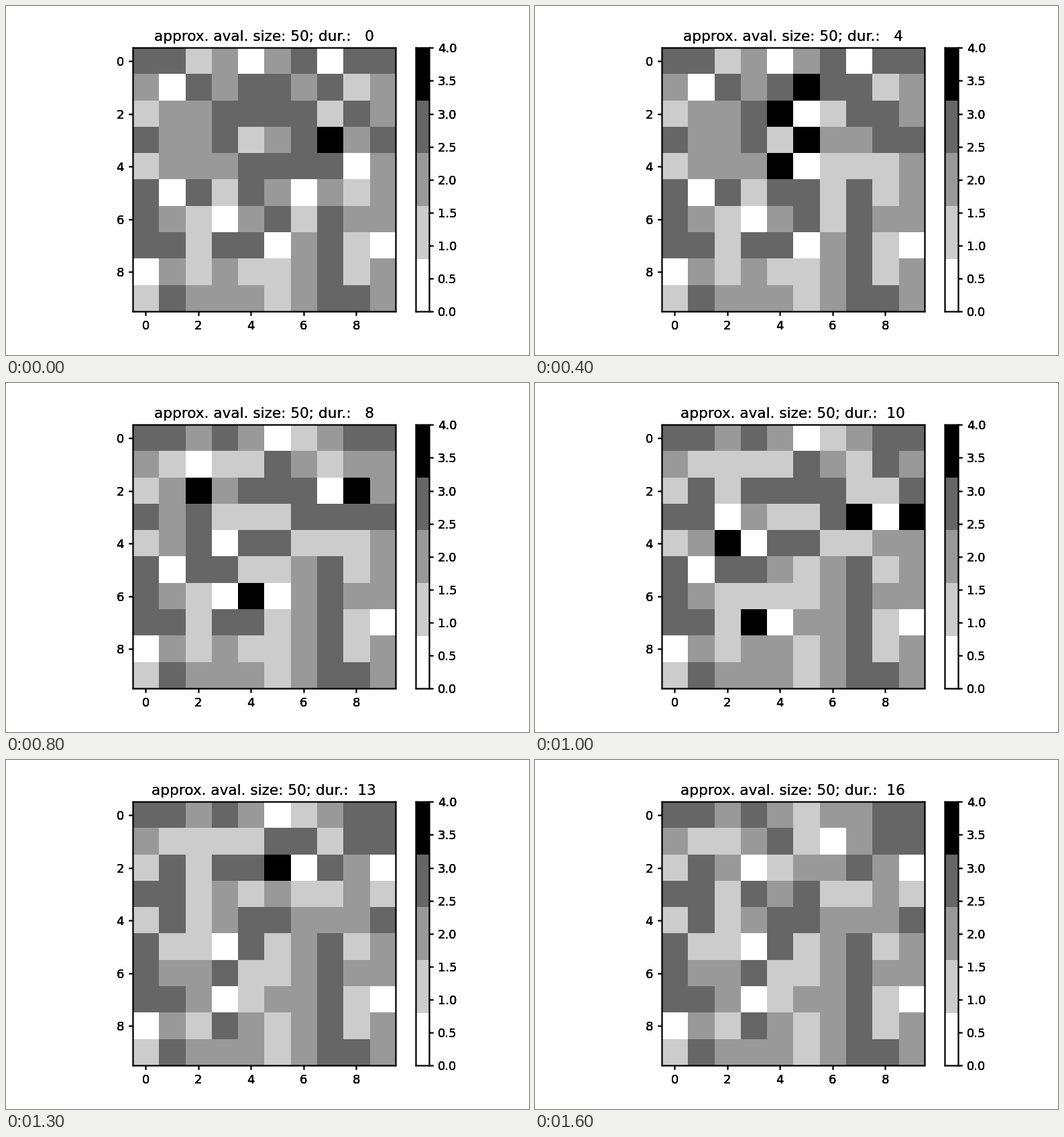
A matplotlib script that plays this animation: 780 px wide and 520 px high, repeating every 1.7 s.

```python
import numpy as np
import matplotlib.pyplot as plt
from matplotlib.animation import FuncAnimation
from matplotlib.colors import ListedColormap

STEPS = 16
LIMIT = 4
START = """
3312023033
2032332312
1223333132
3223123423
1222333302
3031320212
3210231322
3313302310
0212112312
1322212332
"""

plt.rcParams["font.family"] = "DejaVu Sans"
shades = ListedColormap(["1.0", "0.8", "0.6", "0.4", "0.0"])


def topple(grid):
    """Empty every full cell at once and pass one grain to each neighbour."""
    full = grid >= LIMIT
    give = np.pad(full.astype(int), 1)
    gain = give[:-2, 1:-1] + give[2:, 1:-1] + give[1:-1, :-2] + give[1:-1, 2:]
    return np.where(full, 0, grid) + gain


grids = [np.array([[int(c) for c in row] for row in START.split()])]
for _ in range(STEPS):
    grids.append(topple(grids[-1]))

fig = plt.figure(figsize=(6, 4), dpi=130, facecolor="white")
bottom, height = 0.125, 0.755
width = height * 4 / 6
main_box = [0.745 - width, bottom, width, height]
bar_box = [0.78375, bottom, width / 20, height]


def layer(box, xlim, ylim):
    ax = fig.add_axes(box)
    ax.patch.set_visible(False)
    ax.set(xlim=xlim, ylim=ylim)
    return ax


def main_layer():
    ax = layer(main_box, (-0.5, 9.5), (9.5, -0.5))
    ax.set_xticks(range(0, 10, 2))
    ax.set_yticks(range(0, 10, 2))
    return ax


def bar_layer():
    ax = layer(bar_box, (0, 1), (0, LIMIT))
    ax.set_xticks([])
    ax.yaxis.tick_right()
    ticks = np.arange(0, 4.1, 0.5)
    ax.set_yticks(ticks, [f"{t:.1f}" for t in ticks])
    return ax


# Stacked copies of the frames darken the soft edges of lines and labels.
mains = [main_layer() for _ in range(4)]
bars = [bar_layer() for _ in range(4)]

style = dict(cmap=shades, vmin=0, vmax=LIMIT, interpolation="nearest", aspect="auto")
image = mains[0].imshow(grids[0], **style)
bars[0].imshow(np.arange(5)[:, None], origin="lower", extent=(0, 1, 0, LIMIT), **style)
titles = [ax.set_title("") for ax in mains[:2]]


def update(step):
    image.set_data(grids[step])
    for title in titles:
        title.set_text(f"approx. aval. size: 50; dur.: {step:3d}")
    return [image, *titles]


anim = FuncAnimation(fig, update, frames=STEPS + 1, interval=100,
                     repeat=True, repeat_delay=0, blit=False)
plt.show()
```
